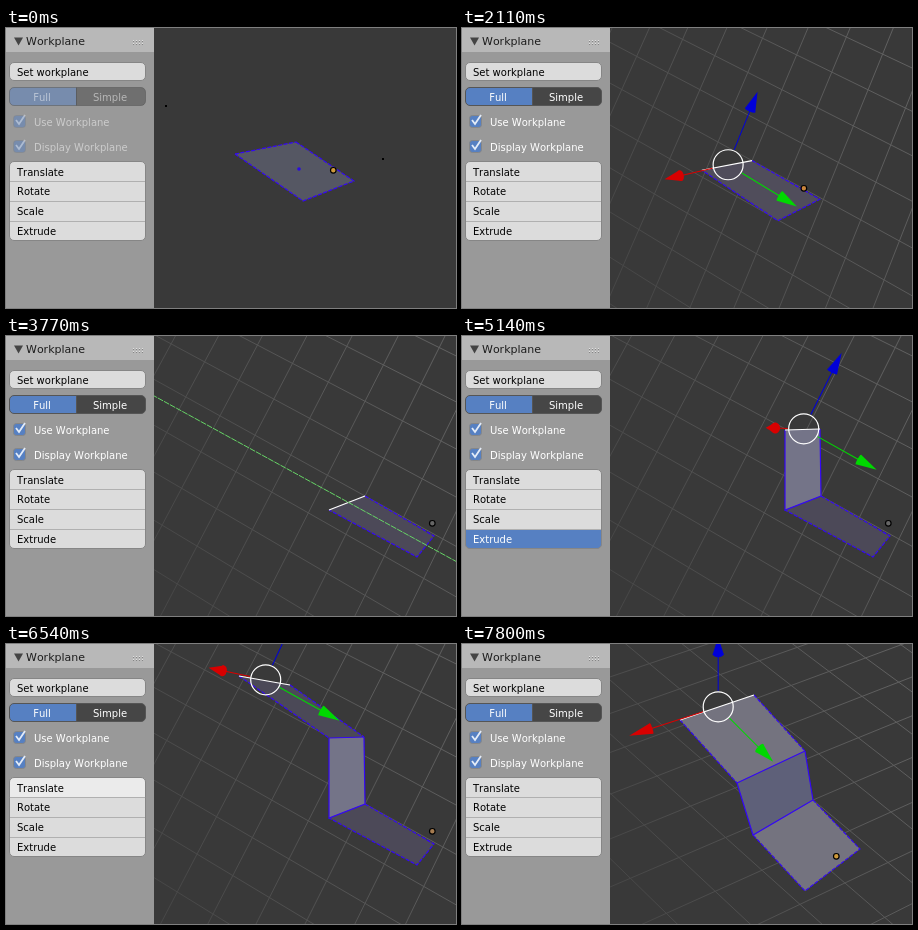
An HTML page with a canvas for the animation above (8970 ms loop, 450 by 280 pixels).

```html
<!DOCTYPE html>
<html lang="en">
<head>
<meta charset="utf-8">
<title>Workplane</title>
<style>
html, body { margin: 0; width: 100%; height: 100%; overflow: hidden; background: #393939; }
canvas { display: block; }
</style>
</head>
<body>
<canvas id="stage" width="450" height="280"></canvas>
<script>
const ctx = document.getElementById('stage').getContext('2d');
const LOOP = 8970;
const BLUE = '#5680c2', EDGE = '#3408f5';

// Camera poses: mesh corners, object origin, face colours, gizmo axes
// (red, green, blue) per selected edge, and the grid plane.
const first = {
  A: [229, 126], B: [290, 114], C: [348, 153], D: [297, 173], origin: [327, 142],
  floor: [89, 88, 104], axes0: [[-77, 14], [65, 44], [24, -74]],
  grid: { u: [32, 18], v: [-12, 33], persp: [-.016, -.006] }
};
const turned = {
  A: [273, 161], B: [313, 151], C: [386, 190], D: [357, 212], origin: [377, 178],
  floor: [74, 70, 84], axes0: [[-50, 14], [72, 40], [35, -73]],
  grid: { u: [37, 20], v: [-18, 38], persp: [-.014, -.006] }
};
const work = {
  A: [323, 174], B: [359, 160], C: [428, 200], D: [411, 221], origin: [426, 187],
  E: [323, 94], F: [358, 93], G: [233, 32], H: [284, 41],
  floor: [76, 73, 88], wall: [116, 116, 136], top: [75, 73, 87],
  axes0: [[-43, 12], [73, 40], [38, -75]],
  axes1: [[-38, -1], [73, 41], [38, -76]],
  axes2: [[-57, -12], [74, 41], [36, -78]],
  grid: { u: [38, 21], v: [-19, 38], persp: [-.012, -.006] }
};
const last = {
  A: [291, 191], B: [351, 156], C: [398, 205], D: [343, 247], origin: [374, 212],
  E: [275, 139], F: [343, 107], G: [218, 76], H: [292, 51],
  floor: [116, 115, 127], wall: [94, 96, 121], top: [116, 115, 127],
  axes2: [[-89, 29], [55, 55], [0, -70]],
  grid: { u: [36, 30], v: [-42, 18], persp: [-.02, -.02] }
};

function mix(a, b, k) {
  if (b === undefined) return a;
  if (typeof a === 'number') return a + (b - a) * k;
  if (Array.isArray(a)) return a.map((x, i) => mix(x, b[i], k));
  return Object.fromEntries(Object.keys(a).map(key => [key, mix(a[key], b[key], k)]));
}
const orbited = mix(work, turned, 1.5);

// Progress in n jumps; the first jump is at start, the last at end.
function steps(t, start, end, n) {
  if (t < start) return 0;
  if (t >= end) return 1;
  return Math.min(n, Math.round((t - start) / (end - start) * (n - 1)) + 1) / n;
}

function poseAt(t) {
  if (t < 1930) return first;
  if (t < 2520) return mix(first, orbited, steps(t, 1930, 2280, 7));
  if (t < 2810) return mix(orbited, work, steps(t, 2520, 2810, 6));
  return mix(work, last, steps(t, 7230, 7800, 11));
}

// Gizmo and axis lines sit on the middle of an edge, on pixel centres.
function pivot(a, b) {
  const [x, y] = mix(a, b, .5);
  return [x + 1.2, y - .7];
}
const rgb = c => `rgb(${c.map(Math.round)})`;

function path(points, close) {
  ctx.beginPath();
  points.forEach(p => ctx.lineTo(...p));
  if (close) ctx.closePath();
}
function polygon(points, fill) {
  path(points, true);
  ctx.fillStyle = fill;
  ctx.fill();
}
function line(points, color, dash = [], width = 1) {
  path(points);
  ctx.strokeStyle = color;
  ctx.lineWidth = width;
  ctx.setLineDash(dash);
  ctx.stroke();
  ctx.setLineDash([]);
}
const dashedEdge = points => line(points, EDGE, [4, 1.5], 1.2);

function dot(p, r, fill, stroke) {
  ctx.beginPath();
  ctx.arc(p[0], p[1], r, 0, 7);
  if (fill) { ctx.fillStyle = fill; ctx.fill(); }
  if (stroke) { ctx.strokeStyle = stroke; ctx.lineWidth = 1.2; ctx.stroke(); }
}

function drawGrid({ u, v, persp }, center) {
  const shade = ctx.createLinearGradient(148, 200, 450, 80);
  shade.addColorStop(0, '#474747');
  shade.addColorStop(1, '#606060');
  const at = (i, j) => [0, 1].map(k =>
    center[k] + (i * u[k] + j * v[k]) / (1 + persp[0] * i + persp[1] * j));
  const n = 16;
  for (let i = -n; i <= n; i++) {
    line([at(i, -n), at(i, n)], shade);
    line([at(-n, i), at(n, i)], shade);
  }
}

function drawArrow([x, y], [dx, dy], color) {
  const length = Math.hypot(dx, dy), base = length * .75;
  ctx.save();
  ctx.translate(x, y);
  ctx.rotate(Math.atan2(dy, dx));
  line([[16, 0], [base, 0]], color);
  polygon([[length, 0], [base, -5.5], [base, 5.5]], color);
  ctx.beginPath();
  ctx.ellipse(base, 0, 5.5 * Math.sqrt(Math.max(.03, 1 - (length / 82) ** 2)), 5.5, 0, 0, 7);
  ctx.fill();
  ctx.restore();
}
function drawGizmo(center, axes) {
  ['#d80000', '#00d800', '#0000d8'].forEach((color, i) => drawArrow(center, axes[i], color));
  dot(center, 15, null, '#fff');
}
function axisLine([x, y], [dx, dy], color) {
  line([[x - dx * 9, y - dy * 9], [x + dx * 9, y + dy * 9]], color, [6, 1]);
}

function drawScene(t) {
  const p = poseAt(t);
  const { A, B, C, D } = p;
  ctx.fillStyle = '#393939';
  ctx.fillRect(148, 0, 302, 280);

  if (t >= 660) drawGrid(p.grid, B);
  else [[160, 78], [377, 131]].forEach(([x, y]) => {
    ctx.fillStyle = '#000';
    ctx.fillRect(x - 1, y - 1, 2, 2);
  });

  const faceSelected = t >= 260 && t < 1320;
  polygon([A, B, C, D], t < 260 ? '#555763' : faceSelected ? '#666672' : rgb(p.floor));
  if (faceSelected) line([B, C, D, A], '#fff');
  else dashedEdge([B, C, D, A]);
  let active = [A, B], axes = p.axes0;

  if (t >= 3830) {
    const k = steps(t, 3830, 4230, 7);
    const E = mix(A, p.E, k), F = mix(B, p.F, k);
    polygon([A, B, F, E], rgb(p.wall));
    line([E, A, B, F], EDGE, [], 1.2);
    active = [E, F];
    axes = p.axes1;

    if (t >= 5270) {
      const grow = t < 6060 ? 1.05 * steps(t, 5270, 5880, 11) : t < 6120 ? 1.03 : 1;
      const G = mix(E, p.G, grow), H = mix(F, p.H, grow);
      polygon([E, F, H, G], rgb(p.top));
      dashedEdge([G, E]);
      dashedEdge([H, F]);
      line([E, F], EDGE, [], 1.2);
      active = [G, H];
      axes = p.axes2;
    }
  }

  if (t < 260) dashedEdge(active);
  else line(active, '#fff', [], 1.2);
  if (t < 1080) dot([293, 141], 1.8, t < 260 ? '#2a0ce0' : '#fff');

  const firstExtrude = t >= 3630 && t < 4470;
  const secondExtrude = t >= 5270 && t < 6360;
  if (firstExtrude) axisLine(pivot(A, B), p.axes0[1], '#66d466');
  if (secondExtrude) {
    axisLine(pivot(p.E, p.F), p.axes1[1], '#66d466');
    axisLine(pivot(p.E, p.F), p.axes1[2], '#4a4ad0');
  }

  const originColor = t >= 3550 && t < 5270 ? '#666'
    : t >= 5270 && t < 7230 ? '#a67c50' : t < 660 || t >= 7230 ? '#cf9a3c' : '#c8843c';
  dot(p.origin.map(x => x + .3), 2.8, originColor, '#000');

  if (t >= 260 && !firstExtrude && !secondExtrude) {
    if (t < 660) axes = [[-66, 28], [73, 26], [0, -86]];
    drawGizmo(faceSelected ? [293, 141] : pivot(...active), axes);
  }
}

function text(label, x, y, color, size = 10, align = 'left') {
  ctx.font = `${size}px "DejaVu Sans", sans-serif`;
  ctx.fontKerning = 'none';
  ctx.textAlign = align;
  ctx.fillStyle = color;
  ctx.fillText(label, x, y);
}
function box(x, y, w, h, fill, radius = 4.5, border = '#868686') {
  ctx.beginPath();
  ctx.roundRect(x, y, w, h, radius);
  ctx.fillStyle = fill;
  ctx.fill();
  ctx.strokeStyle = border;
  ctx.lineWidth = 1;
  ctx.stroke();
}
function checkbox(label, y) {
  box(7.5, y - 6.5, 12, 12, BLUE, 3);
  line([[10, y - 2], [13, y + 2], [19, y - 7]], '#e4ecf8', [], 1.8);
  text(label, 28, y + 4, '#fff');
}

function drawPanel(t) {
  ctx.fillStyle = '#999';
  ctx.fillRect(0, 0, 148, 280);
  ctx.fillStyle = '#b8b8b8';
  ctx.fillRect(0, 0, 148, 24);
  polygon([[8, 9.5], [17, 9.5], [12.5, 17.5]], '#444');
  text('Workplane', 20, 17, '#1c1c1c', 11);
  for (let i = 0; i < 8; i++) {
    const x = 127 + i % 4 * 3, y = 12 + (i >> 2) * 3;
    ctx.fillStyle = '#e0e0e0';
    ctx.fillRect(x, y, 1, 1);
    ctx.fillStyle = '#858585';
    ctx.fillRect(x, y + 1, 1, 1);
  }

  const setting = t >= 660 && t < 770;
  const hoverSet = t >= 440 && t < 660;
  box(3.5, 34.5, 136, 18, setting ? BLUE : hoverSet ? '#e6e6e6' : '#dcdcdc');
  text('Set workplane', 11, 48, setting ? '#fff' : '#000');

  ctx.globalAlpha = t < 660 ? .5 : 1;
  box(3.5, 59.5, 67, 18, BLUE, [4.5, 0, 0, 4.5], '#555');
  box(70.5, 59.5, 69, 18, '#464646', [0, 4.5, 4.5, 0], '#555');
  text('Full', 36, 73, '#fff', 10, 'center');
  text('Simple', 104, 73, '#fff', 10, 'center');
  checkbox('Use Workplane', 94);
  checkbox('Display Workplane', 119);
  ctx.globalAlpha = 1;

  const extruding = t >= 3550 && t < 3630 || t >= 5140 && t < 5270;
  box(3.5, 133.5, 136, 79, '#dcdcdc');
  if (t >= 6540 && t < 7230) box(3.5, 133.5, 136, 20, '#ebebeb', [4.5, 4.5, 0, 0]);
  if (extruding) box(3.5, 193.5, 136, 19, BLUE, [0, 0, 4.5, 4.5]);
  ['Translate', 'Rotate', 'Scale', 'Extrude'].forEach((label, i) => {
    const y = 133.5 + i * 20;
    if (i) line([[4, y], [139, y]], '#b0b0b0');
    text(label, 11, Math.round(147.6 + i * 19.7), i === 3 && extruding ? '#fff' : '#000');
  });
}

const start = performance.now();
function frame() {
  const t = (performance.now() - start) % LOOP;
  drawScene(t);
  drawPanel(t);
  requestAnimationFrame(frame);
}
frame();
</script>
</body>
</html>
```
